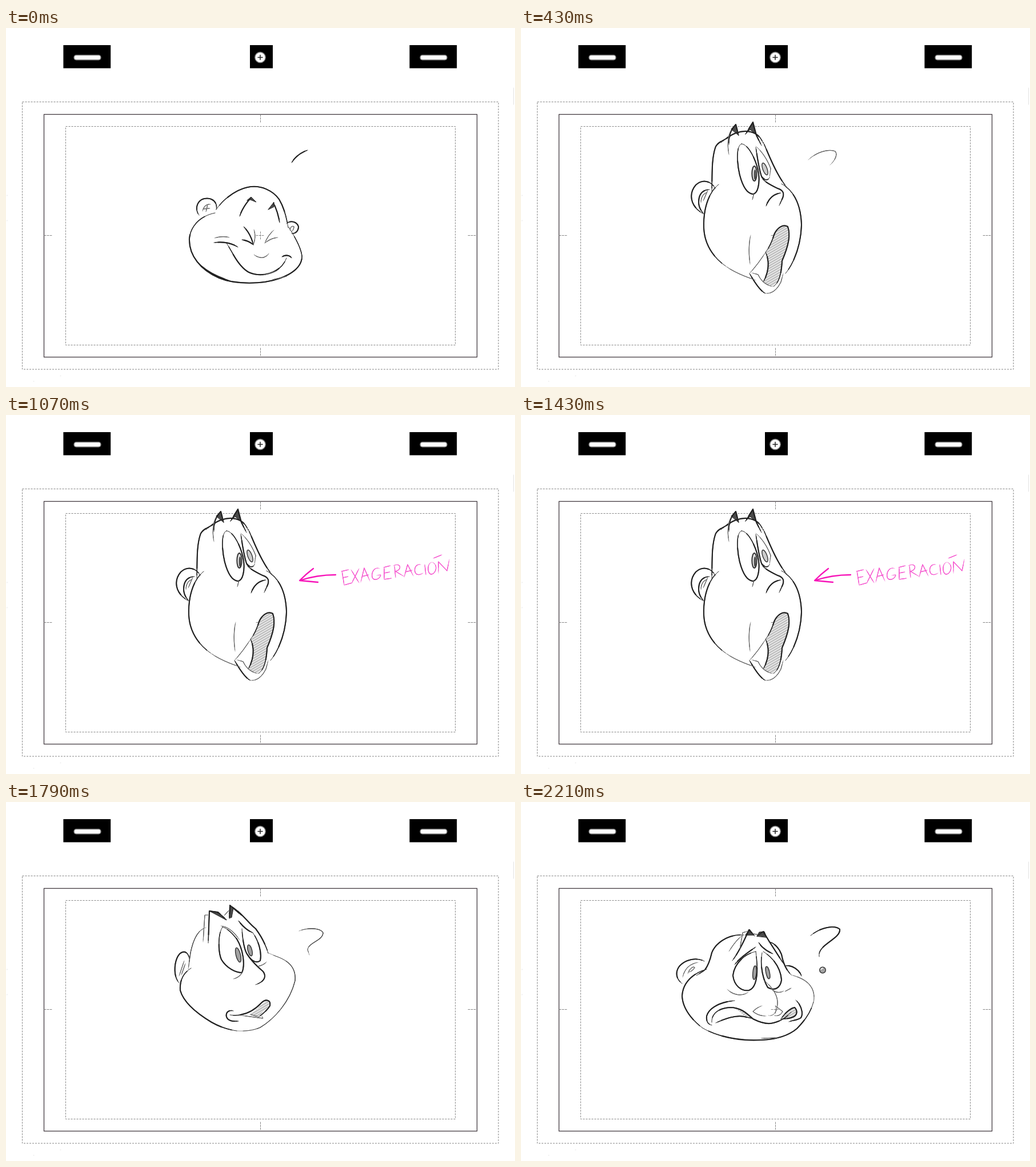
These frames come from a looping animation (891 px wide and 629 px high, 2.57 s). An HTML page:

```html
<!DOCTYPE html>
<html lang="es">
<head>
<meta charset="utf-8">
<title>Exageración</title>
<style>
html, body { margin: 0; width: 100%; height: 100%; overflow: hidden; background: #fff; }
svg { display: block; width: 891px; height: 629px; }
path, ellipse, circle { fill: none; stroke-linecap: round; stroke-linejoin: round; }
.dash { fill: none; stroke: #858585; stroke-width: 1; stroke-dasharray: 3 2; }
.field { fill: none; stroke: #443c42; stroke-width: 1.3; }
.slot { fill: #fff; stroke: #777; stroke-width: 1.5; }
.ink { stroke: #222; stroke-width: 2; }
.thin { stroke: #666; stroke-width: 1.2; }
.hair { fill: #4a4a4a; stroke: #222; stroke-width: 1; }
.shade { fill: url(#hatch); }
.pupil { fill: #a2a2a2; stroke: #333; stroke-width: 1.4; }
.note { stroke: #f558cf; stroke-width: 1.2; }
.arrow { stroke: #f714b8; stroke-width: 2.3; }

.pose, .label, .arrow, .swoosh { visibility: hidden; animation: 2570ms step-end infinite; }
#laugh { animation-name: laugh; }
#rise { animation-name: rise; }
#shout { animation-name: shout; }
#settle { animation-name: settle; }
#doubt { animation-name: doubt; }
#sink { animation-name: sink; }
#sad { animation-name: sad; }
.label { animation-name: label; }
.arrow { animation-name: blink; }
.swoosh { animation-name: swoosh; }
@keyframes laugh { 0% { visibility: visible } 8.17%, 100% { visibility: hidden } }
@keyframes rise { 0%, 16.73%, 100% { visibility: hidden } 8.17% { visibility: visible } }
@keyframes shout { 0%, 61.08%, 100% { visibility: hidden } 16.73% { visibility: visible } }
@keyframes swoosh { 0%, 19.45%, 100% { visibility: hidden } 16.73% { visibility: visible } }
@keyframes settle { 0%, 69.64%, 100% { visibility: hidden } 61.08% { visibility: visible } }
@keyframes doubt { 0%, 77.82%, 100% { visibility: hidden } 69.64% { visibility: visible } }
@keyframes sink { 0%, 85.99%, 100% { visibility: hidden } 77.82% { visibility: visible } }
@keyframes sad { 0% { visibility: hidden } 85.99%, 100% { visibility: visible } }
@keyframes label { 0%, 61.08%, 100% { visibility: hidden } 19.45% { visibility: visible } }
@keyframes blink {
  0%, 22.17%, 33.46%, 44.35%, 61.08%, 100% { visibility: hidden }
  19.45%, 30.73%, 41.63%, 55.64% { visibility: visible }
}
</style>
</head>
<body>
<svg viewBox="0 0 891 629">
  <defs>
    <pattern id="hatch" width="8" height="3.8" patternUnits="userSpaceOnUse" patternTransform="rotate(-30)">
      <rect width="8" height="3.8" fill="#e6e6e6"/>
      <rect width="8" height="1.2" fill="#a4a4a4"/>
    </pattern>
  </defs>

  <!-- animation field -->
  <g>
    <path d="M100.4 30h82.8v40.5h-82.8zM427 30h40v40.5h-40zM706.4 30h82.8v40.5h-82.8z" style="fill:#000"/>
    <rect class="slot" x="119" y="47.5" width="47" height="8.5" rx="4"/>
    <rect class="slot" x="725" y="47.5" width="47" height="8.5" rx="4"/>
    <circle class="slot" cx="445" cy="51.5" r="9.3"/>
    <path d="M441 51.5h8M445 47.5v8" stroke="#222" stroke-width="1.5"/>
    <rect class="dash" x="28.5" y="129.5" width="833.5" height="468.5"/>
    <rect class="dash" x="104.5" y="172.5" width="682" height="383"/>
    <rect class="field" x="66.5" y="151.4" width="758" height="425.2"/>
    <path class="dash" d="M445.5 152v15M445.5 561v15M67 363.5h15M809 363.5h15M445.5 357v14M438 363.5h15"/>
    <path d="M888.5 105v29M2 293v1M2 337v1M95 609.5h1M48 619h1" stroke="#e2e2e2"/>
  </g>

  <g class="pose" id="laugh">
    <path class="hair" d="M422 302L429 296L438 305L428 301ZM459 318L469 305L469 313Z"/>
    <path class="ink" d="M500 236C506 226 516 218 528 214
      M338 328C330 318 334 302 347 299C362 296 371 307 368 318
      M368 318C380 300 403 283 423 279C447 274 468 286 478 300C487 315 491 332 494 350
      M366 324C340 329 323 347 321 369C320 399 341 424 373 438C402 450 450 449 478 439C505 430 519 415 518 399C516 383 503 362 495 349
      M335 410C348 425 370 436 392 443
      M491 343C496 337 509 338 512 348C512 356 506 361 500 360
      M409 330C413 317 421 306 429 297 M479 341C477 328 473 316 468 306
      M416 348C424 356 430 367 433 380 M413 371C421 372 428 375 433 380
      M364 376C380 374 396 377 406 384
      M386 377C396 391 405 417 425 428C450 439 482 428 491 403 M483 401C489 397 497 398 500 403"/>
    <path class="thin" d="M344 321C346 312 352 308 358 309 M345 317L357 316 M353 309L350 322
      M497 355C497 349 501 346 504 348C504 352 502 355 500 357
      M434 353C437 362 436 372 433 380 M453 377C457 367 462 360 469 354 M453 377C460 371 467 368 476 367
      M434 397C440 402 449 404 453 401C456 400 459 397 460 395
      M365 368C375 365 385 365 391 367 M466 441L492 435 M450 433C460 431 468 428 475 425"/>
  </g>

  <g class="pose" id="rise">
    <path class="hair" d="M397 226L403 215L410 231ZM426 232L438 215L442 230Z"/>
    <path class="ink" d="M501 234C510 220 528 211 545 214
      M345 290C335 280 315 283 309 297C304 312 312 328 326 330
      M342 307C341 268 360 242 385 230C410 222 435 232 450 250C462 268 471 289 481 307
      M352 300C325 312 316 345 320 372C326 402 350 424 380 437C415 449 450 450 475 433C500 412 507 380 500 350C496 330 490 318 478 304
      M392 258C392 240 396 224 403 215 M438 215C444 232 448 244 451 259
      M393 282C384 299 392 329 410 337C425 335 421 297 393 282Z
      M423 286C425 307 430 322 441 325C450 319 442 297 423 286
      M436 326C449 333 461 340 458 350C455 356 447 358 439 354
      M374 378C386 374 398 379 405 386
      M392 380C408 402 414 424 438 425C459 424 472 408 476 384 M470 382C475 379 480 381 482 385"/>
    <path class="thin" d="M319 315C318 302 326 294 335 298 M323 315L330 301
      M392 380C419 395 449 394 476 384 M383 268C390 262 396 263 403 270 M429 267L438 276"/>
    <ellipse class="pupil" cx="410" cy="317" rx="4" ry="10" transform="rotate(-12 410 317)"/>
    <ellipse class="pupil" cx="437" cy="310" rx="3" ry="8" transform="rotate(-15 437 310)"/>
  </g>

  <g class="pose" id="shout">
    <path class="shade" d="M428 394L443 364C449 347 463 343 467 348C472 362 466 388 457 408C456 430 451 446 440 453L425 446C433 430 436 408 428 394Z"/>
    <path class="hair" d="M368 177L376 169L381 188ZM393 186L405 166L411 186L401 178Z"/>
    <path class="ink" d="M366 191C352 197 342 202 340 210C333 232 335 260 334 286
      M340 281C333 268 318 264 306 275C293 290 296 312 318 325
      M330 283C318 283 311 292 311 305C311 313 314 319 320 326
      M346 274C327 289 319 320 320 350C321 377 335 401 358 417
      M350 201C366 186 385 178 402 182C414 185 420 192 424 202
      M424 200C434 222 445 254 465 279
      M456 273C478 285 490 310 491 345C490 380 478 412 463 430
      M364 204C363 190 367 178 376 169L381 188 M393 186L406 165L412 188L421 206
      M386 203C376 206 378 238 383 258C388 277 396 290 406 291C415 290 418 272 416 255C412 230 397 203 386 203Z
      M411 209C414 228 416 245 421 260C426 267 432 268 435 262
      M421 262C428 271 437 275 449 281C459 284 462 290 457 300L452 311
      M429 312C433 300 441 291 455 289
      M428 393C435 384 440 372 443 362C448 350 459 343 467 348C472 362 469 380 457 408C456 430 452 446 442 453
      M428 393C436 408 433 430 424 445 M400 430C409 446 420 462 428 465"/>
    <path class="thin" d="M358 417C372 427 388 434 411 442 M364 222C361 207 362 190 367 180
      M326 288C318 290 315 298 315 306 M327 284L319 303 M408 289L405 301
      M411 207C424 218 433 235 437 246L435 262 M400 430C411 418 420 406 428 393
      M404 429L415 432C419 441 427 450 440 453 M428 465C441 466 449 457 455 445L459 430
      M402 363C398 380 399 400 401 414"/>
    <ellipse class="pupil" cx="408.5" cy="255" rx="4.2" ry="13" style="fill:#ddd;stroke-width:2"/>
    <ellipse class="pupil" cx="409.5" cy="257" rx="1" ry="8"/>
    <ellipse class="pupil" cx="427" cy="247" rx="3.8" ry="11" transform="rotate(-20 427 247)" style="fill:#ccc"/>
  </g>
  <g class="swoosh">
    <path class="thin" d="M503 231C515 219 537 211 550 216C555 222 549 233 541 240"/>
  </g>

  <g class="label" aria-label="EXAGERACIÓN">
    <path class="note" d="M588 273L592 298M587 274L600 271M590 285L599 283M592 298L606 294
      M604 271L618 294M618 269L605 295 M621 293L627 268L637 291M623 283L635 280
      M654 269C645 265 639 276 641 284C643 291 654 289 656 280L649 281
      M662 267L662 288M661 267L673 264M662 277L672 275M662 288L675 286
      M680 264L682 285M678 264C691 258 694 270 682 274L697 283
      M697 284L703 262L713 282M699 275L711 272
      M726 262C717 260 713 271 717 277C719 281 726 280 730 277 M733 262L735 280
      M745 258C737 259 737 278 744 279C753 279 757 261 746 258M748 251L763 245
      M757 277L757 257L772 273L776 253"/>
  </g>
  <path class="arrow" d="M577 280C555 280 535 283 514 290M538 269C530 275 520 284 514 290L546 293"/>

  <g class="pose" id="settle">
    <path class="shade" d="M421 399L443 362C450 350 462 347 465 354C467 368 456 386 448 404L436 419Z"/>
    <path class="hair" d="M362 182L369 176L383 193ZM391 194L400 176L406 190Z"/>
    <path class="ink" d="M508 228C522 217 548 214 553 222C552 236 536 242 531 252
      M362 202C336 208 332 238 328 269L325 289
      M330 276C325 261 309 260 302 272C292 288 296 310 310 321
      M336 282C318 294 310 313 311 340C315 371 336 395 362 414C388 430 410 441 428 444C453 434 484 386 499 338C503 304 490 282 460 271
      M400 177C421 195 430 216 441 232C450 250 456 263 462 273
      M360 220C358 202 362 187 369 176L384 194 M391 194L400 176L412 195
      M383 211C373 219 376 250 380 267C387 285 398 294 409 295C418 281 416 255 406 235C398 221 389 211 383 211Z
      M412 215C414 235 417 253 422 264C431 273 438 274 442 269C443 251 435 232 427 222
      M421 264C430 276 440 282 451 289C459 295 458 306 447 316
      M394 400C412 399 431 377 443 362C450 350 462 347 465 354C467 368 456 386 448 404L436 419
      M398 402L421 421L436 419"/>
    <path class="thin" d="M306 301C308 286 315 276 321 277 M309 306L318 285 M350 202C365 190 382 184 397 188
      M400 302L412 298 M431 315C434 307 442 301 450 301 M397 388C391 395 391 405 398 411
      M421 399C429 403 431 410 430 419"/>
    <ellipse class="pupil" cx="407" cy="261" rx="4.5" ry="13" transform="rotate(-8 407 261)"/>
    <ellipse class="pupil" cx="427" cy="253" rx="4" ry="10" transform="rotate(-16 427 253)"/>
  </g>

  <g class="pose" id="doubt">
    <path class="shade" d="M427 372C436 368 448 352 456 348C465 350 462 357 452 366L441 376Z"/>
    <path class="hair" d="M358 192L386 207L372 195ZM391 203L392 181L398 186L395 202Z"/>
    <path class="ink" d="M354 247L356 191L371 193L386 206 M391 204L392 181L414 200
      M392 181C412 193 424 212 437 222C449 238 455 252 459 265
      M321 275C319 262 311 260 304 266C294 277 292 305 303 317
      M324 291C310 300 304 312 305 330C311 352 335 371 360 386C376 395 390 399 404 401
      M379 219C371 230 371 262 377 276C386 291 402 299 413 299C419 285 415 258 404 240C396 230 387 221 379 219Z
      M413 222C414 240 417 260 423 268C431 281 440 282 445 278C448 263 442 243 432 229
      M407 208C414 218 424 226 432 229
      M421 264C430 280 440 288 450 297C456 305 453 315 437 320
      M398 366C388 363 382 372 388 380C393 385 400 384 407 384
      M392 373C410 376 430 370 447 352C455 344 464 347 462 357C458 364 449 372 440 378"/>
    <path class="thin" style="stroke:#444" d="M404 401C420 402 434 400 445 395C470 380 497 350 506 313C508 290 495 278 472 270L458 264
      M513 226C527 220 550 220 555 229C555 243 529 246 528 259L531 268
      M350 220C336 224 328 240 323 264L319 293"/>
    <path class="thin" d="M345 245L348 198L356 198 M382 199L390 190 M303 305L312 278 M307 303L314 283
      M376 217C388 218 400 228 409 242 M398 310C406 308 412 303 414 297 M440 288C447 287 453 284 456 280
      M412 374L450 379L447 374 M427 372L441 376"/>
    <ellipse class="pupil" cx="406.5" cy="268" rx="4" ry="13" transform="rotate(-14 406.5 268)"/>
    <ellipse class="pupil" cx="427" cy="260" rx="3.6" ry="10" transform="rotate(-15 427 260)"/>
  </g>

  <g class="pose" id="sink">
    <path class="shade" d="M415 376L458 364C455 374 443 378 429 382L418 389Z"/>
    <path class="hair" d="M379 203L394 209L385 210ZM407 207L411 196L416 206Z"/>
    <path class="ink" d="M372 223L379 204L394 210 M407 207L412 196L427 214
      M371 212C350 218 334 236 328 251L320 283
      M412 197C430 214 446 236 455 256L464 280
      M322 289C300 296 291 318 294 340C302 361 320 374 340 386C365 401 405 404 445 399
      M464 280C478 287 496 294 505 305C508 325 500 350 484 372C474 385 464 393 452 398
      M505 312C506 330 500 348 484 372
      M397 231C380 246 371 262 373 284C377 302 390 312 401 310C413 306 414 290 413 272C412 252 407 238 397 231Z
      M421 226C420 250 421 275 428 290C438 300 446 300 449 290C449 270 441 250 428 238
      M416 223C422 236 432 242 441 246
      M379 364C370 370 363 376 364 380C367 386 375 389 383 387
      M386 374C395 372 404 377 414 374C430 370 445 364 459 363C455 374 443 378 435 383L427 381L418 390C412 390 406 383 397 374"/>
    <path class="thin" d="M318 277C308 270 297 272 291 283C287 298 291 312 299 318
      M298 297C301 286 307 280 311 279 M303 295L309 284
      M372 223C368 234 362 242 351 247 M359 244C362 232 366 223 372 212 M392 209C400 204 408 206 411 210
      M326 380C345 391 355 396 365 399 M466 270C474 270 479 275 481 281
      M427 287C436 303 448 312 452 324C453 333 448 340 441 344
      M429 340C423 340 419 339 418 338C420 334 425 334 428 335 M438 300C448 306 457 305 461 302
      M420 377C427 376 428 383 423 386
      M515 227C530 224 548 222 551 230C550 243 522 247 524 265"/>
    <path d="M372 318C382 329 403 327 411 312" stroke="#aaa"/>
    <ellipse class="pupil" cx="404" cy="278" rx="3.4" ry="13" transform="rotate(5 404 278)"/>
    <ellipse class="pupil" cx="431" cy="274" rx="3.2" ry="11" transform="rotate(-10 431 274)"/>
    <circle class="thin" cx="532" cy="279.5" r="4.6"/>
    <circle class="thin" cx="533" cy="279" r="2"/>
  </g>

  <g class="pose" id="sad">
    <path class="shade" d="M371 361C385 362 395 370 402 377L389 374C385 368 379 364 371 361ZM455 380C462 370 472 361 479 360C484 365 484 372 478 376C470 380 462 380 455 380Z"/>
    <path class="hair" d="M393 233L400 223L408 233ZM413 235L417 228L426 227L430 237Z"/>
    <path class="ink" d="M390 233C362 231 340 248 334 264C331 277 328 287 321 295L307 304
      M321 279C308 272 288 275 277 288C270 298 271 310 282 318
      M325 293C300 300 283 318 282 340C283 362 300 383 318 396
      M318 396C345 412 385 419 420 417C450 416 470 408 483 397C497 383 508 367 512 350
      M473 303C462 292 458 278 456 267C450 252 440 246 434 245
      M370 278C382 262 392 240 399 224L409 235 M413 235L424 227L435 245L460 284
      M411 262C390 266 373 285 371 304C373 322 386 332 399 330C413 325 416 300 411 262Z
      M374 285C384 272 398 263 411 254 M416 246C422 256 432 262 441 266
      M422 264C418 285 423 310 432 325C445 332 454 325 456 312C455 295 445 275 424 262
      M374 348C350 350 329 360 325 375C324 383 327 390 334 391
      M334 386C333 372 345 361 366 360C385 360 395 370 406 380C420 387 432 390 442 387C455 384 465 377 473 368
      M341 387C360 378 380 372 395 377C399 378 402 378 406 380
      M481 347C490 355 495 370 490 378C485 382 478 382 469 385
      M455 380C462 370 472 361 479 360C484 365 484 372 478 376C470 380 462 380 455 380Z
      M463 287C475 285 488 295 491 305
      M507 234C525 219 550 215 558 223C560 240 518 250 522 271"/>
    <path class="thin" d="M512 352C516 330 508 312 473 303 M283 307C286 292 296 283 310 281
      M292 301C294 293 301 287 304 290C302 294 297 298 293 298
      M383 258L388 229L398 226 M364 262C370 252 378 241 386 235 M406 231L414 232
      M361 328C371 339 388 341 398 333 M436 325C444 335 453 335 460 331 M462 332L473 326
      M424 311C440 325 453 340 448 360C447 370 440 376 433 374
      M422 357C413 360 408 365 406 367C412 372 420 375 429 375 M445 357L458 367C455 373 449 376 443 374
      M420 414L450 413"/>
    <ellipse class="pupil" cx="409" cy="299" rx="3.2" ry="12" transform="rotate(5 409 299)"/>
    <ellipse class="pupil" cx="432" cy="299" rx="3.2" ry="11" transform="rotate(-12 432 299)"/>
    <circle class="pupil" cx="528" cy="294.5" r="5.3"/>
    <path d="M525 293l3 -2" stroke="#eee" stroke-width="2"/>
  </g>
</svg>
<script>
// Taper each pencil stroke: a fine full line under shorter, wider ones.
function taper(path, width) {
  for (const d of path.getAttribute('d').split(/(?=M)/)) {
    for (const [inset, scale] of [[0, 0.45], [5, 0.72], [16, 1]]) {
      const line = path.cloneNode();
      line.setAttribute('d', d);
      line.setAttribute('pathLength', 100);
      line.style.strokeWidth = width * scale;
      if (inset) {
        line.style.strokeDasharray = `${100 - 2 * inset} 200`;
        line.style.strokeDashoffset = -inset;
      }
      path.before(line);
    }
  }
  path.remove();
}
document.querySelectorAll('path.ink').forEach(p => taper(p, 2.1));
document.querySelectorAll('path.thin').forEach(p => taper(p, 1.2));
document.querySelectorAll('path.note').forEach(p => taper(p, 1.3));
</script>
</body>
</html>
```
